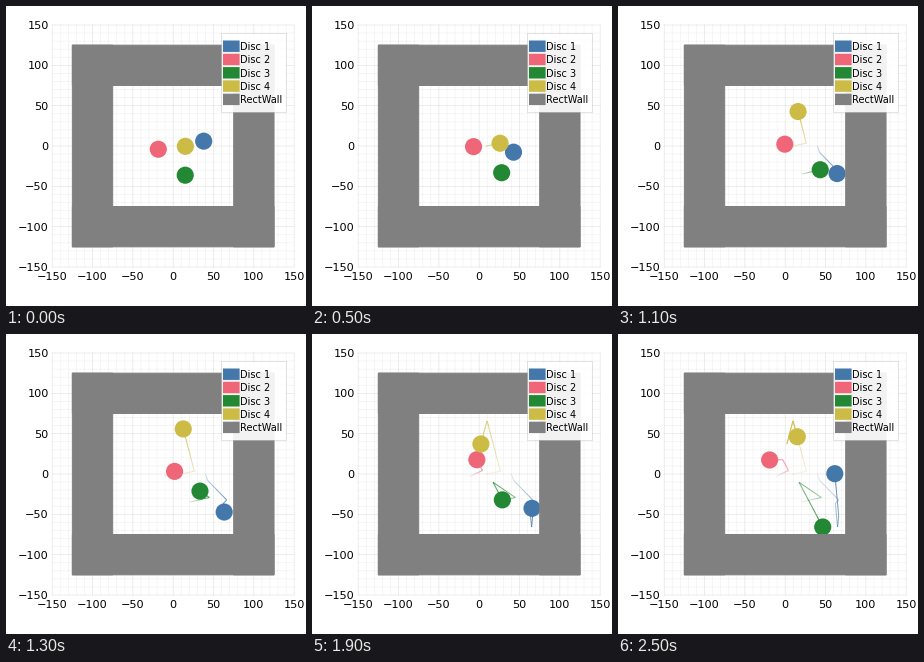
A matplotlib script for the animation above (2.55 s loop, 300 by 300 pixels).

```python
import numpy as np
import matplotlib.pyplot as plt
from matplotlib.animation import FuncAnimation
from matplotlib.collections import LineCollection
from matplotlib.colors import to_rgb
from matplotlib.patches import Circle, Rectangle

SIZE, DPI = 300, 100
FRAMES, INTERVAL = 51, 50
PT = 72 / DPI                 # points per pixel
SCALE = 242 / 300             # pixels per data unit
CX, CY = 167.2, 140           # pixel position of the data origin
WALL = "#808080"
REACH = 66.3                  # farthest a disc centre gets before a wall turns it back
TRAIL_START = 4

# Free flight between disc collisions: (frame, x, y). Coordinates run on
# straight through the walls and are folded back into the box.
DISCS = {
    "Disc 1": ("#4477AA", [(0, 37.8, 6), (10.1, 42.6, -7.8), (23, 70.4, -36.4), (50, 61.5, -133)]),
    "Disc 2": ("#EE6677", [(0, -18.5, -4), (5.1, -9.7, -2), (30.2, 4, 4.3), (38, -2.9, 17.7),
                           (50, -19.3, 17.4)]),
    "Disc 3": ("#228833", [(0, 14.9, -36.2), (23, 44.7, -29.1), (30.2, 17.1, -10.2),
                           (50, 46.5, -65.7)]),
    "Disc 4": ("#CCBB44", [(0, 15.1, -0.4), (5.1, 8.6, -0.1), (10.1, 26.2, 3.5), (38, 2.1, 95.4),
                           (50, 15, 46.2)]),
}


def px(x):
    return CX + SCALE * x


def py(y):
    return CY - SCALE * y


def fold(p):
    """Reflect a free path between the walls at -REACH and REACH."""
    return REACH - np.abs((p + REACH) % (4 * REACH) - 2 * REACH)


def draw_grid():
    for v in range(-150, 151, 10):
        major = v % 50 == 0
        style = dict(color="black", alpha=0.1 if major else 0.05, lw=0.7 * PT,
                     snap=False, zorder=1)
        ax.plot([px(v)] * 2, [py(-150), py(150)], **style)
        ax.plot([px(-150), px(150)], [py(v)] * 2, **style)
        if major:
            label = str(v).replace("-", "\u2212")
            style = dict(va="baseline", size=11.2 * PT)
            ax.text(px(v), 274, label, ha="center", **style)
            ax.text(42.7, py(v) + 4, label, ha="right", **style)


def draw_wall(x, y, half_w, half_h):
    corner = px(x - half_w), py(y + half_h)
    ax.add_patch(Rectangle(corner, 2 * SCALE * half_w, 2 * SCALE * half_h,
                           fc=WALL, ec=WALL, lw=PT, snap=False, zorder=5))


def draw_legend():
    ax.add_patch(Rectangle((214.5, 26.5), 65.5, 79.5, fc=(1, 1, 1, 0.9), ec=(0, 0, 0, 0.1),
                           lw=PT, zorder=6))
    entries = [(name, color) for name, (color, _) in DISCS.items()] + [("RectWall", WALL)]
    for i, (name, color) in enumerate(entries):
        y = 40.2 + 13.3 * i
        ax.add_patch(Rectangle((217, y - 5.7), 16.6, 11.4, fc=color, lw=0,
                               snap=False, zorder=7))
        ax.text(234.4, y + 3.8, name, va="baseline", size=9.8 * PT, zorder=7)


class Disc:
    def __init__(self, color, path):
        self.rgb = to_rgb(color)
        self.t, self.x, self.y = np.array(path).T
        self.body = ax.add_patch(Circle((0, 0), 10 * SCALE + 0.5, fc=color, lw=0, zorder=4))
        self.trail = ax.add_collection(
            LineCollection([], linewidths=PT, capstyle="butt", zorder=3), autolim=False)

    def at(self, t):
        x, y = (fold(np.interp(t, self.t, p)) for p in (self.x, self.y))
        return np.column_stack([px(x), py(y)])

    def update(self, now):
        self.body.center = tuple(self.at([now])[0])
        hits = self.t[(self.t > TRAIL_START) & (self.t < now)]
        times = np.union1d(hits, np.arange(TRAIL_START, now + 0.1, 0.5))
        points = self.at(times)
        self.trail.set_segments(np.stack([points[:-1], points[1:]], axis=1))
        # Older parts of the trail fade out.
        self.trail.set_color([(*self.rgb, t / now) for t in times[:-1]])


plt.rcParams["font.family"] = "DejaVu Sans"
fig = plt.figure(figsize=(SIZE / DPI, SIZE / DPI), dpi=DPI, facecolor="white")
ax = fig.add_axes([0, 0, 1, 1])
ax.set_xlim(0, SIZE)
ax.set_ylim(SIZE, 0)
ax.axis("off")

draw_grid()
for side in (-100, 100):
    draw_wall(side, 0, 25, 125)
    draw_wall(0, side, 125, 25)
draw_legend()
discs = [Disc(color, path) for color, path in DISCS.values()]


def update(frame):
    for disc in discs:
        disc.update(frame)
    return []


anim = FuncAnimation(fig, update, frames=FRAMES, interval=INTERVAL,
                     init_func=lambda: update(0), repeat=True, repeat_delay=0)
plt.show()
```
